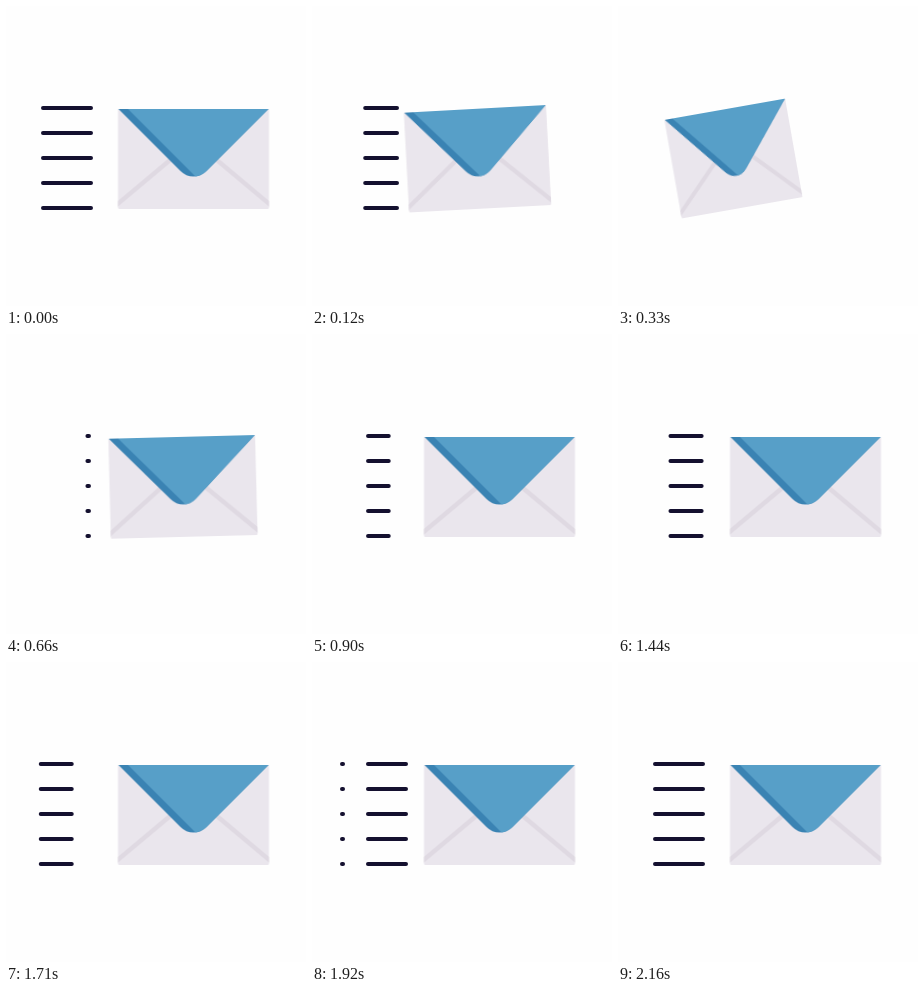
An HTML page that plays this animation: 300 by 300 pixels, repeating every 2.19 s.

```html
<!DOCTYPE html>
<html lang="en">
<head>
<meta charset="utf-8">
<title>Sending mail</title>
<style>
  html, body { margin: 0; width: 100%; height: 100%; overflow: hidden; background: #fefefe; }
  svg { display: block; width: 100vw; height: 100vh; }

  .lines {
    fill: none; stroke: #14102f; stroke-width: 4; stroke-linecap: round;
    animation: flow 2190ms infinite, trim 2190ms infinite, blink 2190ms step-end infinite;
  }
  .envelope { animation: dart 2190ms cubic-bezier(.333, 0, .667, 1) infinite; }

  /* The dash runs four full turns along the 64px line. */
  @keyframes flow {
    0%     { stroke-dashoffset: -9px; }
    27.4%  { stroke-dashoffset: -9px; animation-timing-function: cubic-bezier(.333, 0, .667, .7); }
    30.14% { stroke-dashoffset: -11px; animation-timing-function: cubic-bezier(.333, .17, .667, .09); }
    52.05% { stroke-dashoffset: -39px; animation-timing-function: cubic-bezier(.333, .16, .667, .657); }
    65.75% { stroke-dashoffset: -138px; animation-timing-function: cubic-bezier(.333, .373, .667, .76); }
    78.08% { stroke-dashoffset: -220px; animation-timing-function: cubic-bezier(.333, .78, .667, 1); }
    98%, 100% { stroke-dashoffset: -265px; }
  }
  @keyframes trim {
    0%     { stroke-dasharray: 48px 16px; animation-timing-function: ease-in-out; }
    13.7%  { stroke-dasharray: 0px 64px; }
    29.3%  { stroke-dasharray: 0px 64px; animation-timing-function: linear; }
    30.14% { stroke-dasharray: 1.5px 62.5px; animation-timing-function: cubic-bezier(.3, .2, .6, 1); }
    52.05% { stroke-dasharray: 32px 32px; }
    78.08% { stroke-dasharray: 31px 33px; animation-timing-function: ease-in-out; }
    98%, 100% { stroke-dasharray: 48px 16px; }
  }
  @keyframes blink {
    0%    { opacity: 1; }
    13.7% { opacity: 0; }
    29.3% { opacity: 1; }
  }
  @keyframes dart {
    0%, 32.65%, 100% { transform: translate(187.5px, 153px) rotate(0deg) scaleX(1); }
    15.07%, 22.37%   { transform: translate(115.5px, 152.5px) rotate(-10deg) scaleX(.813); }
  }
</style>
</head>
<body>
<svg viewBox="0 0 300 300">
  <clipPath id="body">
    <path d="M-75.5-50H75.5V48.500Q75.500 50 74 50H-74Q-75.500 50-75.500 48.500Z"/>
  </clipPath>
  <path class="lines" d="M94 102H30M94 127H30M94 152H30M94 177H30M94 202H30"/>
  <g class="envelope">
    <g clip-path="url(#body)">
      <rect x="-76" y="-51" width="152" height="102" fill="#eae6ed"/>
      <path d="M-80 48.500L-18-3.500M80 48.500L18-3.500" stroke="#dfd9e2" stroke-width="4.500"/>
    </g>
    <path d="M-75-50H75L13 12Q7.500 17.500 0 17.500T-13 12Z" fill="#3a83b3"/>
    <path d="M-65.500-50H75L13 12Q8.500 16.500 2 17.400Z" fill="#579fc8"/>
  </g>
</svg>
</body>
</html>
```
